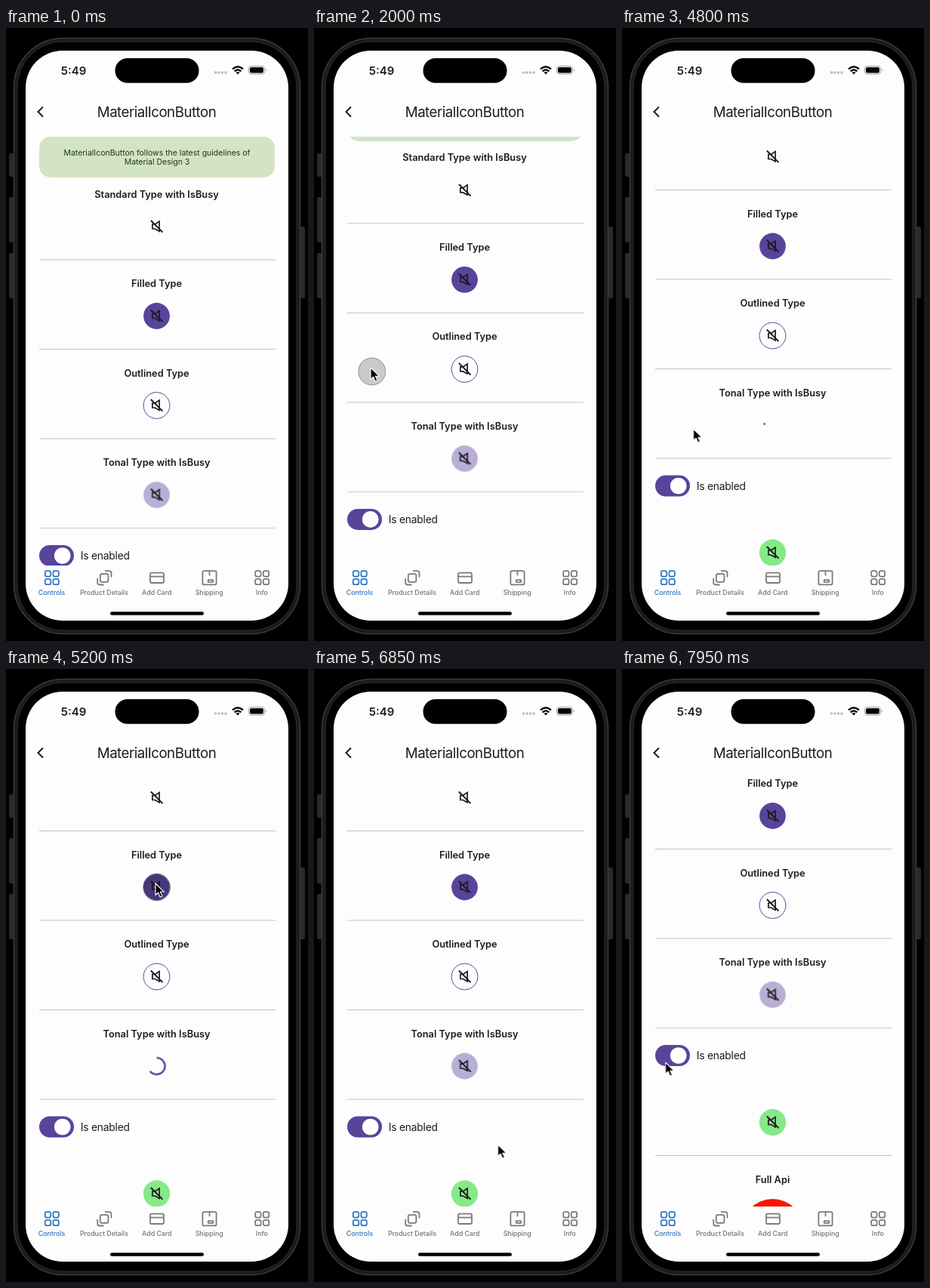
Write an HTML page that moves like this. It is 400x812 px and loops after 8000 ms.

```html
<!DOCTYPE html>
<html lang="en">
<head>
<meta charset="utf-8">
<title>MaterialIconButton</title>
<style>
html, body { margin: 0; width: 100%; height: 100%; overflow: hidden; background: #000; }
svg { display: block; width: 100vw; height: 100vh; }
text { font-family: Inter, Roboto, sans-serif; fill: #1c1b1f; }
.mid { text-anchor: middle; }
.heading { font-size: 12.8px; font-weight: 600; }
.note { font-size: 10.5px; fill: #1d3a12; }
.tab text { font-size: 8.8px; font-weight: 500; fill: #757575; }
.tab { fill: none; stroke: #7a7a7a; stroke-width: 1.8; stroke-linejoin: round; }
.tab text { stroke: none; }
.tab.on { stroke: #2f78c0; }
.tab.on text { fill: #2f78c0; }
.rule { stroke: #c2c2c4; stroke-width: 1; }

/* One 8 s timeline: 1% = 80 ms */
.scroll, .cursor, .touch, .dim, .dialog, .busy, .idle, .turn { animation: 8s infinite; }
.scroll { animation-name: scroll; animation-timing-function: linear; }
.cursor { animation-name: cursor; animation-timing-function: ease-in-out; }
.touch { animation-name: touch; animation-timing-function: step-end; }
.dim { animation-name: fade; animation-timing-function: linear; }
.dialog { animation-name: fade, pop; animation-duration: 8s; animation-timing-function: linear, ease-out; transform-origin: 200.5px 418.5px; }
.busy { animation-name: busy; animation-timing-function: step-end; }
.idle { animation-name: idle; animation-timing-function: step-end; }
.turn { animation-name: turn; animation-timing-function: linear; }
.arc { animation: arc 1s -.2s infinite ease-in-out; }

@keyframes scroll {
  0%, 20% { transform: translateY(0); }
  25% { transform: translateY(-48px); }
  30%, 92.5% { transform: translateY(-92.5px); }
  98.75%, 100% { transform: translateY(-187px); }
}
@keyframes cursor {
  0%, 12% { transform: translate(-16px, 560px); }
  19%, 20% { transform: translate(75px, 498px); animation-timing-function: linear; }
  25% { transform: translate(75px, 450px); animation-timing-function: linear; }
  30% { transform: translate(75px, 405.5px); }
  37.5%, 46% { transform: translate(197.5px, 519px); }
  55%, 60.5% { transform: translate(94.5px, 531px); }
  64.5%, 66.5% { transform: translate(198px, 284px); }
  70.25%, 73.5% { transform: translate(188px, 451px); }
  82.5%, 86% { transform: translate(243.5px, 630px); }
  91.5%, 92.5% { transform: translate(57.5px, 615.5px); animation-timing-function: linear; }
  98.75%, 100% { transform: translate(57.5px, 521px); }
}
@keyframes touch {
  0%, 30%, 41.5%, 66%, 71.75%, 99%, 100% { opacity: 0; }
  20%, 40%, 64.75%, 70.5%, 92.5% { opacity: 1; }
}
@keyframes fade {
  0%, 66.25%, 74.4%, 100% { opacity: 0; }
  68.75%, 71.75% { opacity: 1; }
}
@keyframes pop {
  0%, 66.25% { transform: scale(1.15); }
  69.5%, 100% { transform: scale(1); }
}
@keyframes busy { 0%, 80%, 100% { opacity: 0; } 42% { opacity: 1; } }
@keyframes idle { 0%, 80%, 100% { opacity: 1; } 42% { opacity: 0; } }
@keyframes turn {
  from { transform: rotate(-452.6deg); }
  to { transform: rotate(603.4deg); }
}
@keyframes arc {
  0% { stroke-dasharray: 14 346; stroke-dashoffset: 0; }
  50% { stroke-dasharray: 250 110; stroke-dashoffset: -40; }
  100% { stroke-dasharray: 14 346; stroke-dashoffset: -360; }
}
</style>
</head>
<body>
<svg viewBox="0 0 400 812" preserveAspectRatio="none">
  <defs>
    <clipPath id="screen"><rect x="26" y="30" width="348" height="755" rx="49"/></clipPath>
    <clipPath id="page"><rect x="26" y="144" width="348" height="568"/></clipPath>
    <g id="mute" fill="none" stroke="#1c1b1f" stroke-width="1.7">
      <path d="M-5.6-3H-2.2L3.6-7V6.2L-2.2 3H-5.6Z"/>
      <path d="M-7.6-8 8 7.6" stroke-width="2"/>
    </g>
    <g id="grid">
      <rect x="-9" y="-9" width="7.4" height="7.4" rx="2"/>
      <rect x="1.6" y="-9" width="7.4" height="7.4" rx="2"/>
      <rect x="-9" y="1.6" width="7.4" height="7.4" rx="2"/>
      <rect x="1.6" y="1.6" width="7.4" height="7.4" rx="2"/>
    </g>
  </defs>

  <!-- Phone body -->
  <g fill="#2a2a2b">
    <rect x="4" y="166" width="8" height="31" rx="2"/>
    <rect x="4" y="224" width="8" height="60" rx="2"/>
    <rect x="4" y="298" width="8" height="60" rx="2"/>
    <rect x="388" y="263" width="8" height="95" rx="2"/>
  </g>
  <rect x="10.5" y="13.5" width="379" height="789" rx="65" fill="#1b1b1c" stroke="#3a3a3b" stroke-width="1.5"/>
  <rect x="15" y="18" width="370" height="780" rx="60" fill="#000" stroke="#2e2e2f"/>

  <g clip-path="url(#screen)">
    <rect x="26" y="30" width="348" height="755" fill="#fdfdfd"/>

    <!-- Status bar -->
    <text class="mid" x="89.5" y="61.5" font-size="15" font-weight="600">5:49</text>
    <g fill="#bdbdbf">
      <circle cx="277.5" cy="59" r="1.8"/><circle cx="282" cy="59" r="1.8"/>
      <circle cx="286.5" cy="59" r="1.8"/><circle cx="291" cy="59" r="1.8"/>
    </g>
    <g fill="none" stroke="#000" stroke-width="2.3">
      <path d="M300 54.4Q307 48 314 54.4M302.7 57.3Q307 53.5 311.3 57.3"/>
      <path d="M304.5 58.8Q307 57 309.5 58.8L307 61.5Z" fill="#000" stroke="none"/>
    </g>
    <rect x="321.5" y="50.5" width="21" height="10.5" rx="3.2" fill="none" stroke="#9a9a9c"/>
    <rect x="323" y="52" width="18" height="7.5" rx="2"/>
    <path d="M344 54v3.6q2-1.8 0-3.6" fill="#9a9a9c"/>

    <!-- Navigation bar -->
    <path d="M49 104.5 42.5 111 49 117.5" fill="none" stroke="#1c1b1f" stroke-width="2"/>
    <text class="mid" x="199.5" y="118" font-size="18.7" letter-spacing="-.5">MaterialIconButton</text>

    <g clip-path="url(#page)"><g class="scroll" id="content">
      <rect x="44" y="144" width="312" height="54" rx="15" fill="#d3e3c5"/>
      <text class="mid note" x="200" y="169">MaterialIconButton follows the latest guidelines of</text>
      <text class="mid note" x="200" y="181">Material Design 3</text>

      <rect x="44" y="685" width="46" height="28" rx="14" fill="#58459a"/>
      <circle cx="74.7" cy="699" r="10.8" fill="#fff"/>
      <text x="98.7" y="704" font-size="13.8" letter-spacing="-.2">Is enabled</text>
      <circle cx="199.5" cy="787.5" r="17.7" fill="#86e987"/>
      <use href="#mute" x="199.5" y="787.5"/>
      <path class="rule" d="M44 831.5H357"/>
      <text class="mid heading" x="199.5" y="867.5">Full Api</text>
      <circle cx="199.5" cy="930.7" r="41.7" fill="#fb1404"/>
    </g></g>

    <!-- Tab bar -->
    <g class="tab on"><use href="#grid" x="60.8" y="728.2"/><text class="mid" x="60.5" y="751.3">Controls</text></g>
    <g class="tab">
      <rect x="124.8" y="723.2" width="10.6" height="10.6" rx="2"/>
      <path d="M131 719.2h5.5a3 3 0 0 1 3 3v5.3M121.2 729v5.5a3 3 0 0 0 3 3h5.3"/>
      <text class="mid" x="130" y="751.3">Product Details</text>
    </g>
    <g class="tab">
      <rect x="191" y="721.6" width="18" height="13.4" rx="2"/><path d="M191 726.7h18"/>
      <text class="mid" x="199.8" y="751.3">Add Card</text>
    </g>
    <g class="tab">
      <rect x="260.4" y="719.2" width="18.2" height="18.2" rx="2"/>
      <path d="M269.5 719v6.2M267.8 731.2h6.4v2.6h-6.4Z"/>
      <text class="mid" x="269.2" y="751.3">Shipping</text>
    </g>
    <g class="tab"><use href="#grid" x="339.2" y="728.2"/><text class="mid" x="338.8" y="751.3">Info</text></g>
    <rect x="138" y="773.3" width="124" height="4.4" rx="2.2"/>

    <!-- Alert -->
    <rect class="dim" x="26" y="30" width="348" height="755" fill="rgba(0,0,0,.22)"/>
    <g class="dialog">
      <rect x="81" y="364" width="239.5" height="109.5" rx="12" fill="#ececed"/>
      <path d="M81 434.5H320.5" stroke="#cfcfd1"/>
      <text class="mid" x="200" y="395.3" font-size="14.4" font-weight="600">MaterialButton</text>
      <text class="mid" x="200" y="413" font-size="11.1">Filled button command executed</text>
      <text class="mid" x="200" y="459.5" font-size="15" font-weight="600" style="fill:#1f83f5">Ok</text>
    </g>
  </g>
  <rect x="144.5" y="40" width="111" height="32.7" rx="16.3"/>

  <g class="cursor">
    <circle class="touch" cx="1.7" cy="5" r="18" fill="rgba(0,0,0,.2)" stroke="rgba(0,0,0,.35)"/>
    <path d="M0 0V15.5L3.6 12.2 6.2 18.3 9 17.1 6.4 11.2H11.2Z" fill="#000" stroke="#fff" stroke-width="1.1" stroke-linejoin="round"/>
  </g>
</svg>
<script>
const sections = [
  { title: 'Standard Type with IsBusy', fill: 'none', edge: 'none' },
  { title: 'Filled Type', fill: '#58459a', edge: 'none' },
  { title: 'Outlined Type', fill: 'none', edge: '#58459a' },
  { title: 'Tonal Type with IsBusy', fill: '#b8aed6', edge: 'none', busy: true }
];
const spinner = `<g class="busy"><g class="turn"><circle class="arc" r="11" pathLength="360"
  fill="none" stroke="#58459a" stroke-width="2.4"/></g></g>`;

const sectionMarkup = ({ title, fill, edge, busy }, i) => `
  <g transform="translate(199.5 ${263 + 118.5 * i})">
    <text class="mid heading" y="-38.5">${title}</text>
    <g class="${busy ? 'idle' : ''}">
      <circle r="17.4" fill="${fill}" stroke="${edge}"/>
      <use href="#mute"/>
    </g>
    ${busy ? spinner : ''}
    <path class="rule" d="M-155.5 44H157.5"/>
  </g>`;

document.getElementById('content')
  .insertAdjacentHTML('beforeend', sections.map(sectionMarkup).join(''));
</script>
</body>
</html>
```
